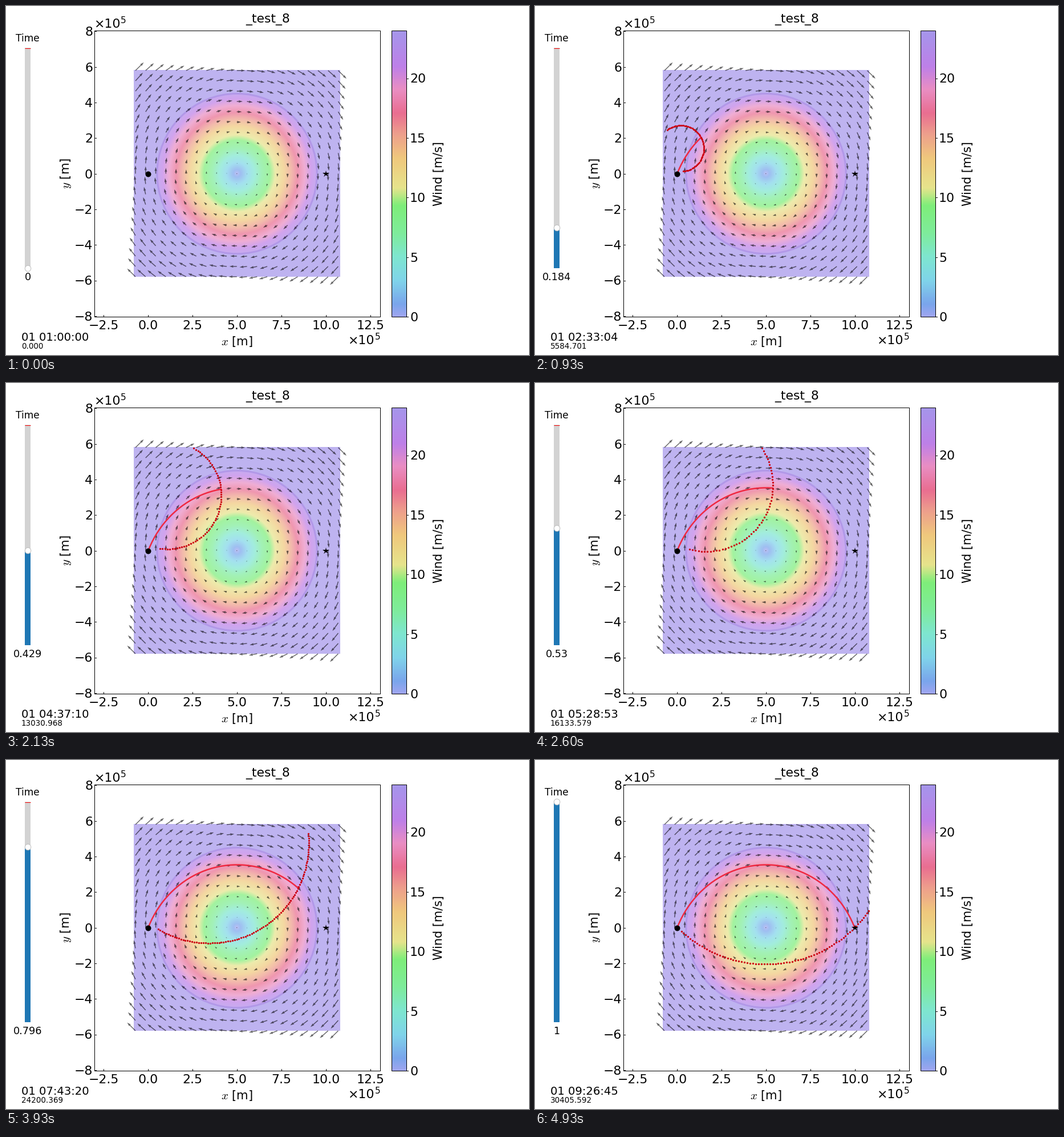
A matplotlib script that plays this animation: 917x611 px, repeating every 5.06 s.

```python
import numpy as np
import matplotlib.pyplot as plt
from matplotlib.animation import FuncAnimation
from matplotlib.colors import LinearSegmentedColormap
from matplotlib.patches import Circle, Rectangle

W, H, DPI = 917, 611, 64
LOOP_MS, STEP_MS = 5060, 20
LAST, FLIGHT_S = 49, 30405.592
X0, Y0, UNIT = 249.3, 293.6, 31.15      # pixel origin and pixels per 1e5 m
LEFT, RIGHT, TOP, BOTTOM = 154.5, 656, 43, 544
BAR_LEFT, BAR_RIGHT, WIND_MAX = 676.4, 701.5, 24
TRACK_TOP, TRACK_BOTTOM = 73, 458.5
CENTRE, EDGE = 5, 5.8                   # vortex centre and half the domain
REACH = 7.05                            # distance flown through the air
TICK = 22

plt.rcParams["font.family"] = "DejaVu Sans"
plt.rcParams["mathtext.fontset"] = "cm"

fig = plt.figure(figsize=(W / DPI, H / DPI), dpi=DPI, facecolor="white")
ax = fig.add_axes([0, 0, 1, 1])
ax.axis("off")


def pt(px):
    return px * 72 / DPI


def label(x, y, text, size=TICK, ha="center", va="baseline", **kw):
    return ax.text(x, y, text, fontsize=pt(size), ha=ha, va=va, **kw)


def stroke(x, y, color="black", width=1.0, **kw):
    return ax.plot(x, y, color=color, lw=pt(width), **kw)[0]


def marker(x, y, shape, size, color, **kw):
    return ax.plot(x, y, shape, color=color, ms=pt(size), mew=0, **kw)[0]


def box(left, top, right, bottom, face="none", edge="none", z=2):
    patch = Rectangle((left, top), right - left, bottom - top, facecolor=face,
                      edgecolor=edge, lw=pt(1), zorder=z)
    return ax.add_patch(patch)


def picture(pixels, extent):
    ax.imshow(pixels, extent=extent, aspect="auto", interpolation="nearest", zorder=1)


def number(value, digits):
    return f"{value:.{digits}f}".replace("-", "\u2212")


def wind_colormap():
    stops = [(0, "#a0a5f0"), (1, "#7aa5ec"), (3, "#80d4ea"), (5, "#7ee6d0"),
             (7, "#7eec9b"), (9.3, "#7eee7a"), (10.8, "#e6e48c"),
             (13.3, "#f0c87d"), (15.3, "#eea08c"), (17.1, "#e96e91"),
             (19.1, "#ea8ec3"), (21, "#be80e8"), (WIND_MAX, "#a596eb")]
    return LinearSegmentedColormap.from_list(
        "wind", [(v / WIND_MAX, color) for v, color in stops], 512)


def draw_field(cmap):
    cx = X0 + CENTRE * UNIT
    side = np.linspace(-EDGE, EDGE, 362)
    r = np.hypot(*np.meshgrid(side, side))
    wind = np.where(r > 4.5, WIND_MAX, 5 * r)
    pale = 1 - 0.72 * (1 - cmap(wind / WIND_MAX)[..., :3])
    picture(pale, (224, 586, 474, 112.5))
    ax.add_patch(Circle((cx, Y0), 4.5 * UNIT, fill=False, lw=pt(3),
                        edgecolor="#b298e8", zorder=2))
    gx, gy = np.meshgrid(np.linspace(227, 582.5, 21), np.linspace(113, 474, 21))
    ax.quiver(gx, gy, 2.5 * (Y0 - gy) / UNIT, -2.5 * (gx - cx) / UNIT,
              units="dots", scale_units="dots", scale=1, width=1.4,
              color="black", alpha=0.6, zorder=3)


def draw_frame():
    box(LEFT, TOP, RIGHT, BOTTOM, edge="black", z=4)
    for v in np.arange(-2.5, 13, 2.5):
        x = X0 + v * UNIT
        stroke([x, x], [BOTTOM, BOTTOM - 3.5])
        label(x, 566, number(v, 1))
    for v in range(-8, 9, 2):
        y = Y0 - v * UNIT
        stroke([LEFT, LEFT + 3.5], [y, y])
        label(152, y + 8, number(v, 0), ha="right")
    for x, y in [(LEFT, 38.5), (600, 592)]:
        label(x, y, "\u00d710", ha="left")
        label(x + 46.5, y - 8, "5", 0.7 * TICK, ha="left")
    label(405, 594, "$x$ [m]", 21)
    label(105, 293, "$y$ [m]", 21, va="center", rotation=90)
    label(459, 28.5, "_test_8", 21.9)


def draw_colorbar(cmap):
    ramp = cmap(np.linspace(1, 0, 501))[:, None, :3]
    picture(ramp, (BAR_LEFT, BAR_RIGHT, BOTTOM, TOP))
    box(BAR_LEFT, TOP, BAR_RIGHT, BOTTOM, edge="black", z=4)
    for v in range(0, 21, 5):
        y = BOTTOM - (BOTTOM - TOP) * v / WIND_MAX
        stroke([BAR_RIGHT, BAR_RIGHT + 3], [y, y])
        label(708, y + 8, str(v), ha="left")
    label(759, 293.5, "Wind [m/s]", 20.8, va="center", rotation=90)


def fly(heading, share):
    """Straight flight through air that makes a quarter turn in one loop."""
    start = -CENTRE + REACH * share * np.exp(1j * np.radians(heading))
    return start * np.exp(-0.5j * np.pi * share)


def to_pixels(z):
    return X0 + (CENTRE + z.real) * UNIT, Y0 - z.imag * UNIT


shares = np.arange(LAST + 1) / LAST
headings = np.arange(-75, 146, 1.3)
rays = fly(headings, shares[:, None])
inside = np.maximum(abs(rays.real), abs(rays.imag)) < EDGE
alive = np.logical_and.accumulate(inside)   # a ray that leaves never returns


def front_at(step):
    share = shares[step]
    stride = 3 - (share > 0.4) - (share > 0.7)
    shown = alive[step] & (headings >= -75 + 32 * share)
    shown &= np.arange(len(headings)) % stride == 0
    return to_pixels(rays[step, shown])


def short(value):
    """Fewest decimals that stay within a thousandth."""
    digits = next(d for d in range(4) if abs(value - round(value, d)) < 1e-3)
    return f"{value:.{digits}f}"


cmap = wind_colormap()
draw_field(cmap)
draw_frame()
draw_colorbar(cmap)

route_x, route_y = to_pixels(fly(45, shares))
path = stroke([], [], "#f02840", 2.5, zorder=5)
front = marker([], [], "o", 3.3, "#cc0010", zorder=6)
marker(X0, Y0, "o", 10, "black", zorder=7)
marker(X0 + 10 * UNIT, Y0, "*", 12, "black", zorder=7)

label(38, 62, "Time", 17)
box(33, TRACK_TOP, 43, TRACK_BOTTOM, face="lightgrey")
fill = box(33, TRACK_BOTTOM, 43, TRACK_BOTTOM, face="tab:blue", z=3)
stroke([33, 43], [TRACK_TOP + 0.5] * 2, "red", 1, zorder=4, solid_capstyle="butt")
handle = ax.plot([38.4], [TRACK_BOTTOM], "o", mfc="white", mec="0.75",
                 ms=pt(10.5), mew=pt(1), zorder=5)[0]
value_text = label(38, 479.5, "", 17.6)
clock_text = label(27, 586, "", 19.6, ha="left")
seconds_text = label(27, 600, "", 13.5, ha="left")

ax.set_xlim(0, W)
ax.set_ylim(H, 0)


def step_at(ms):
    """Steps alternate between 130 ms and 70 ms."""
    pairs, rest = divmod(ms, 200)
    return min(int(2 * pairs + (rest >= 130)), LAST)


def update(frame):
    step = step_at(frame * STEP_MS + STEP_MS / 2)
    share = shares[step]
    seconds = share * FLIGHT_S
    level = TRACK_BOTTOM - share * (TRACK_BOTTOM - TRACK_TOP)
    path.set_data(route_x[:step + 1], route_y[:step + 1])
    front.set_data(*front_at(step))
    fill.set_y(level)
    fill.set_height(TRACK_BOTTOM - level)
    handle.set_ydata([level])
    value_text.set_text(short(share))
    clock = int(seconds) + 3600
    clock_text.set_text(f"01 {clock // 3600:02d}:{clock // 60 % 60:02d}:{clock % 60:02d}")
    seconds_text.set_text(f"{seconds:.3f}")
    return path, front, fill, handle, value_text, clock_text, seconds_text


anim = FuncAnimation(fig, update, frames=LOOP_MS // STEP_MS, interval=STEP_MS,
                     repeat=True, repeat_delay=0)
plt.show()
```
